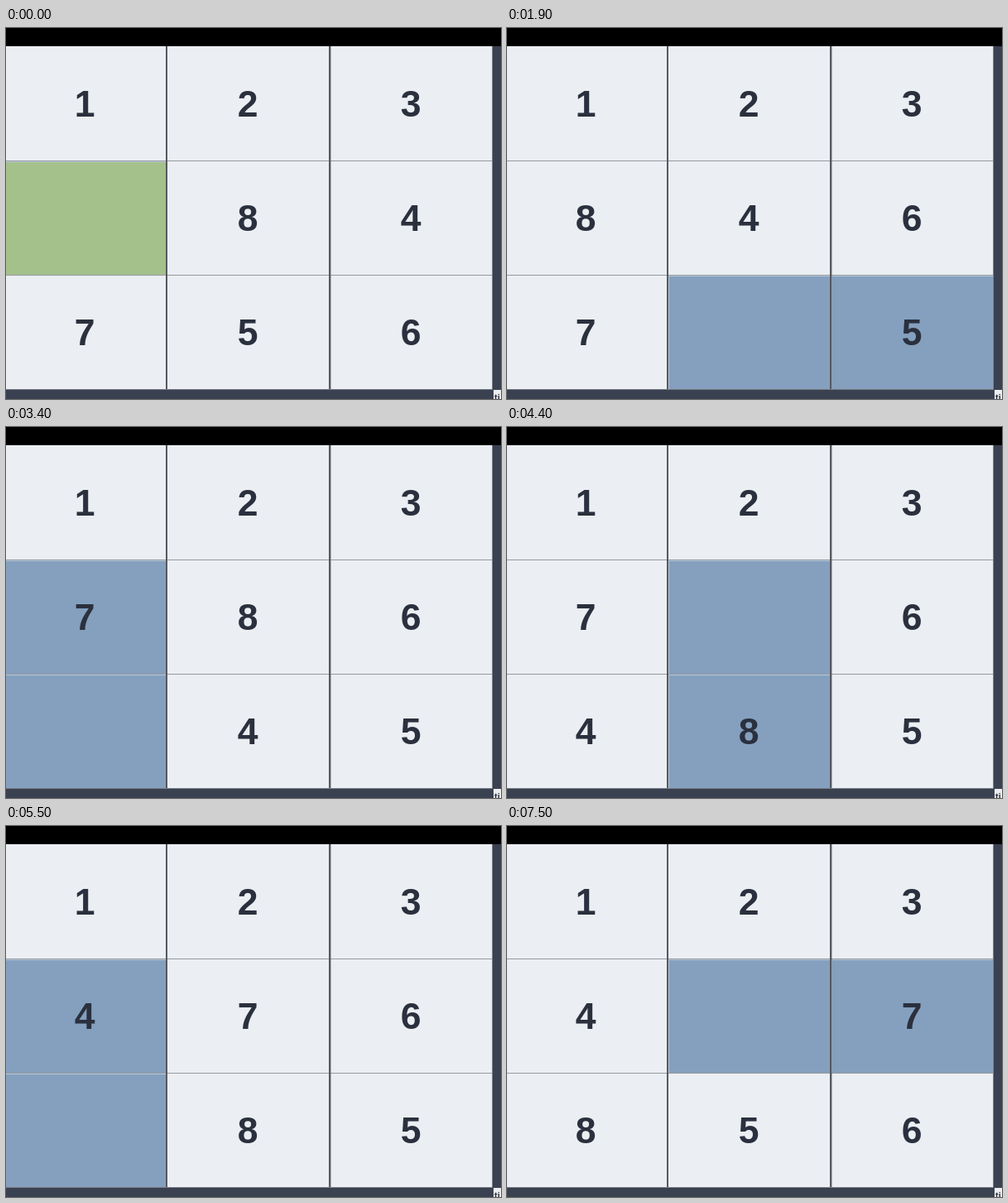
An HTML page for the animation above (8000 ms loop, 598 by 448 pixels).

```html
<!DOCTYPE html>
<html lang="en">
<head>
<meta charset="utf-8">
<title>Sliding puzzle</title>
<style>
  html, body { margin: 0; width: 100%; height: 100%; overflow: hidden; background: #3a4151; }
  svg { display: block; width: 598px; height: 448px; }
  .cell rect { fill: #ebeef2; }
  .cell path { fill: none; stroke: #b3c8da; stroke-width: 1; visibility: hidden; }
  .cell text { font: bold 44.5px "Liberation Sans", Arial, sans-serif; text-anchor: middle; fill: #2b303e; }
  .active rect { fill: #84a0be; }
  .active path { visibility: visible; }
  .start rect { fill: #a4c18c; }
  .corner { font: bold 11px "Liberation Sans", Arial, sans-serif; fill: #30343c; }
</style>
</head>
<body>
<svg viewBox="0 0 598 448">
  <rect width="598" height="448" fill="#3a4151"/>
  <rect x="587" y="22" width="1" height="415" fill="#85888f"/>
  <g id="board"></g>
  <g fill="#96999e">
    <rect y="160" width="587" height="1"/>
    <rect y="298" width="587" height="1"/>
  </g>
  <g fill="#56595f">
    <rect x="193" y="22" width="2" height="415"/>
    <rect x="390" y="22" width="2.4" height="415"/>
  </g>
  <rect y="436" width="588" height="1" fill="#777b83"/>
  <rect width="598" height="22"/>
  <rect x="589" y="437" width="9" height="11" fill="#eceef0"/>
  <text class="corner" x="590" y="450">ti</text>
</svg>
<script>
  const NS = "http://www.w3.org/2000/svg";
  const LOOP = 8000;
  const START = [1, 2, 3, 0, 8, 4, 7, 5, 6];
  // Cell the gap moves to, and when.
  const gaps = [3, 4, 5, 8, 7, 4, 3, 6, 7, 4, 3, 6, 7, 8, 5, 4];
  const times = [0, 300, 900, 1400, 1900, 2400, 2900, 3400, 3900, 4400, 4900, 5500, 6000, 6500, 7000, 7500];
  const cols = [[0, 193], [195, 390], [392, 587]];
  const rows = [[22, 160], [161, 298], [299, 436]];

  const board = document.getElementById("board");

  function add(parent, tag, attrs) {
    const el = document.createElementNS(NS, tag);
    for (const key in attrs) el.setAttribute(key, attrs[key]);
    return parent.appendChild(el);
  }

  const cells = START.map((_, i) => {
    const c = i % 3, r = Math.floor(i / 3);
    const [x0, x1] = cols[c], [y0, y1] = rows[r];
    const group = add(board, "g", { class: "cell" });
    add(group, "rect", { x: x0, y: y0, width: x1 - x0, height: y1 - y0 });
    add(group, "path", { d: `M${x0 + (c ? 0.5 : -1)} ${y1}V${y0 + 0.5}H${x1}` });
    const label = add(group, "text", { x: 95 + 197 * c, y: 107 + 138.2 * r });
    return { group, label };
  });

  const states = [START];
  for (let i = 1; i < gaps.length; i++) {
    const next = states[i - 1].slice();
    next[gaps[i - 1]] = next[gaps[i]];
    next[gaps[i]] = 0;
    states.push(next);
  }

  let shown = -1;

  function show(step) {
    cells.forEach(({ group, label }, i) => {
      const active = i === gaps[step] || i === gaps[step - 1];
      group.setAttribute("class", "cell" + (active ? " active" : "") + (active && !step ? " start" : ""));
      label.textContent = states[step][i] || "";
    });
    shown = step;
  }

  function frame() {
    const t = performance.now() % LOOP;
    const step = times.filter(at => at <= t).length - 1;
    if (step !== shown) show(step);
    requestAnimationFrame(frame);
  }

  frame();
</script>
</body>
</html>
```
